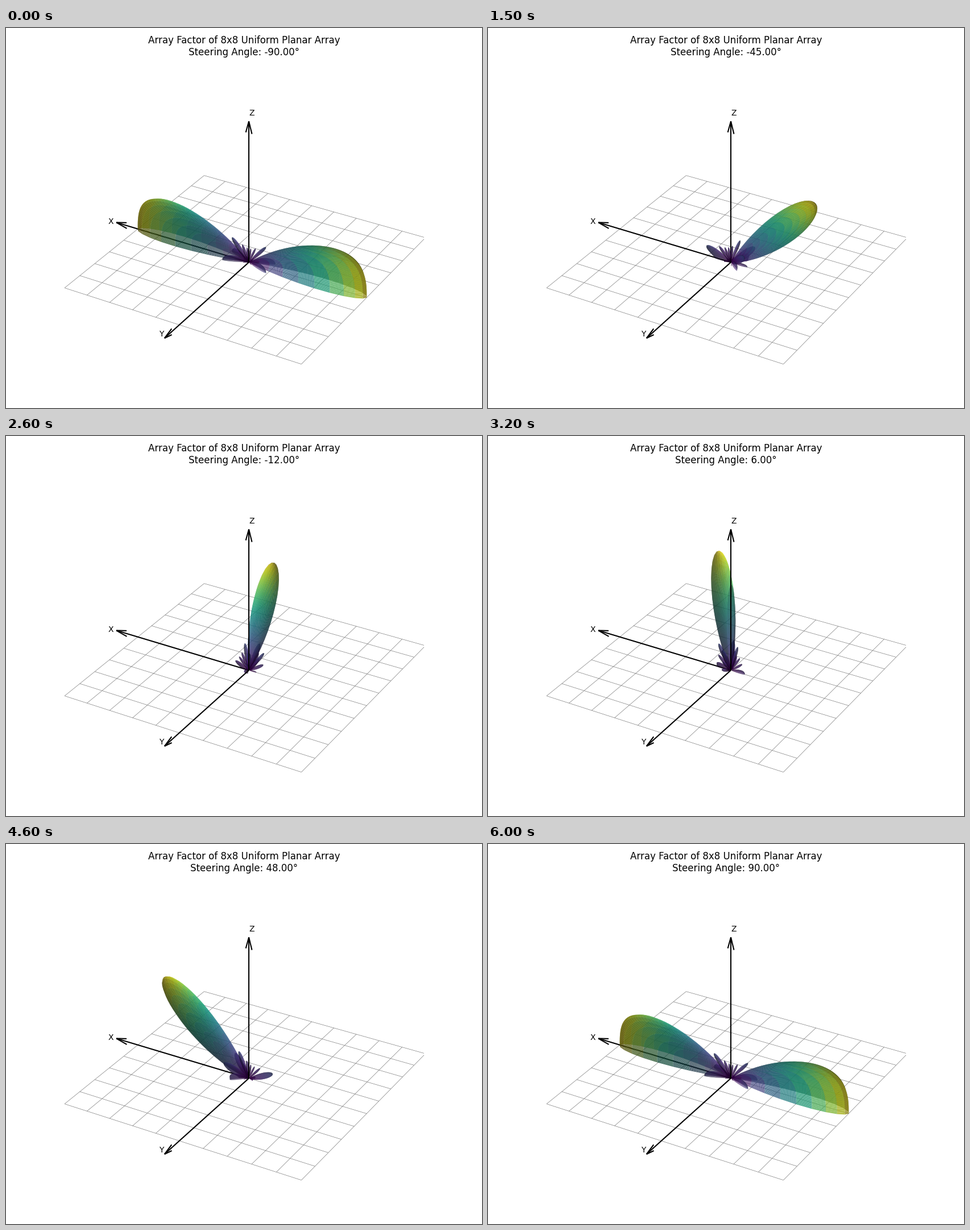
A matplotlib script that plays this animation: 837 px wide and 669 px high, repeating every 6.1 s.

```python
import numpy as np
import matplotlib.pyplot as plt
from matplotlib.animation import FuncAnimation
from matplotlib.collections import LineCollection, PolyCollection
from matplotlib.patches import Rectangle

W, H, DPI = 837, 669, 100
N = 8                                   # elements per side, half-wave spacing
ELEV, AZIM, DIST = np.radians(30), np.radians(120), 10
UNIT, FOCUS_Z = 0.6877, 0.4             # scene scale and height looked at
CENTER_X, CENTER_Y, SCALE = 427.05, 332.0, 3421.6
ALPHA = 0.76
MIN_AREA = 0.06                         # smaller faces are invisible

ce, se, ca, sa = np.cos(ELEV), np.sin(ELEV), np.cos(AZIM), np.sin(AZIM)
RIGHT = np.array([-sa, ca, 0])
UP = np.array([-se * ca, -se * sa, ce])
TOWARD = np.array([ce * ca, ce * sa, se])

alt, az = np.radians(19.4712), np.radians(-135)
LIGHT = np.array([np.cos(az) * np.cos(alt), np.sin(az) * np.cos(alt), np.sin(alt)])


def project(points):
    """Perspective projection to pixels, plus the distance from the camera."""
    p = (np.asarray(points, float) - [0, 0, FOCUS_Z]) * UNIT
    depth = DIST - p @ TOWARD
    x = CENTER_X + SCALE * (p @ RIGHT) / depth
    y = CENTER_Y - SCALE * (p @ UP) / depth
    return np.stack([x, y], axis=-1), depth


def quads(a):
    """Corner values of every mesh cell, in perimeter order."""
    cells = np.stack([a[:-1, :-1], a[:-1, 1:], a[1:, 1:], a[1:, :-1]], axis=2)
    return cells.reshape(-1, *cells.shape[2:])


def line_factor(u):
    """Normalised array factor of one row of elements."""
    phase = np.pi * u[..., None] * np.arange(N)
    return np.abs(np.exp(1j * phase).mean(axis=-1))


def cross2(a, b):
    return a[:, 0] * b[:, 1] - a[:, 1] * b[:, 0]


theta, phi = np.meshgrid(np.radians(np.linspace(-90, 90, 181)),
                         np.radians(np.linspace(-90, 90, 121)))
DIRS = np.stack([np.sin(theta) * np.cos(phi),
                 np.sin(theta) * np.sin(phi),
                 np.cos(theta)], axis=-1)
Y_FACTOR = line_factor(DIRS[..., 1])
VIRIDIS = plt.get_cmap("viridis")


def pattern(angle):
    """Faces sorted back to front, their colours and the nearest depth."""
    steer = np.sin(np.radians(angle))
    r = line_factor(DIRS[..., 0] - steer) * Y_FACTOR
    pts = r[..., None] * DIRS
    xy, depth = project(pts)

    faces = quads(pts)
    flat = quads(xy)
    area = 0.5 * np.abs(cross2(flat[:, 2] - flat[:, 0], flat[:, 3] - flat[:, 1]))
    far = quads(depth).mean(axis=1)
    order = np.argsort(-far, kind="stable")
    order = order[area[order] > MIN_AREA]

    f = faces[order]
    normal = np.cross(f[:, 2] - f[:, 0], f[:, 3] - f[:, 1])
    length = np.linalg.norm(normal, axis=1) + 1e-15
    shade = 0.65 + 0.35 * (normal @ LIGHT) / length
    colors = VIRIDIS(r[:-1, :-1].ravel()[order])
    colors[:, :3] *= shade[:, None]
    colors[:, 3] = ALPHA
    return flat[order], colors, depth.min()


def arrow(axis, side, length=1.2, head=0.1):
    """Shaft and two head strokes along one axis, and the nearest depth."""
    axis, side = np.array(axis, float), np.array(side, float)
    tip = length * axis
    back = tip - head * np.cos(np.radians(15)) * axis
    spread = head * np.sin(np.radians(15)) * side
    segs, depth = project([[0 * tip, tip], [tip, back + spread], [tip, back - spread]])
    lines = LineCollection(segs, colors="black", linewidths=1.5)
    ax.add_collection(lines, autolim=False)
    return lines, depth.min()


# The small surplus keeps the pixel size from rounding down
fig = plt.figure(figsize=((W + 0.01) / DPI, (H + 0.01) / DPI), dpi=DPI, facecolor="white")
ax = fig.add_axes([0, 0, 1, 1])
ax.set_xlim(0, W)
ax.set_ylim(H, 0)
ax.axis("off")
title = fig.suptitle("", fontsize=12)

# Ground grid, cut off at the sides of the plot area
ticks = np.linspace(-1, 1, 11)
ground = [[(t, -1, 0), (t, 1, 0)] for t in ticks] + [[(-1, t, 0), (1, t, 0)] for t in ticks]
grid = LineCollection(project(ground)[0], colors="gray", linewidths=0.5, zorder=1)
ax.add_collection(grid, autolim=False)
grid.set_clip_path(Rectangle((102, 0), 633, H, transform=ax.transData))

x_arrow, _ = arrow((1, 0, 0), (0, 0, 1))
y_arrow, _ = arrow((0, 1, 0), (0, 0, 1))
z_arrow, z_depth = arrow((0, 0, 1), (1, 0, 0))
x_arrow.set_zorder(2)
y_arrow.set_zorder(5)

for name, x, y in (("X", 184, 345), ("Y", 273, 543), ("Z", 432, 154)):
    ax.text(x, y, name, fontsize=10, ha="center", va="baseline", zorder=6)

surface = PolyCollection([], edgecolors="none", linewidths=0, zorder=3)
ax.add_collection(surface, autolim=False)


def update(i):
    angle = -90 + 3 * i
    verts, colors, nearest = pattern(angle)
    surface.set_verts(verts)
    surface.set_facecolor(colors)
    z_arrow.set_zorder(2 if nearest < z_depth else 4)
    title.set_text("Array Factor of 8x8 Uniform Planar Array\n"
                   f"Steering Angle: {angle:.2f}°")
    return surface, z_arrow, title


anim = FuncAnimation(fig, update, frames=61, interval=100, repeat=True, repeat_delay=0)
plt.show()
```
